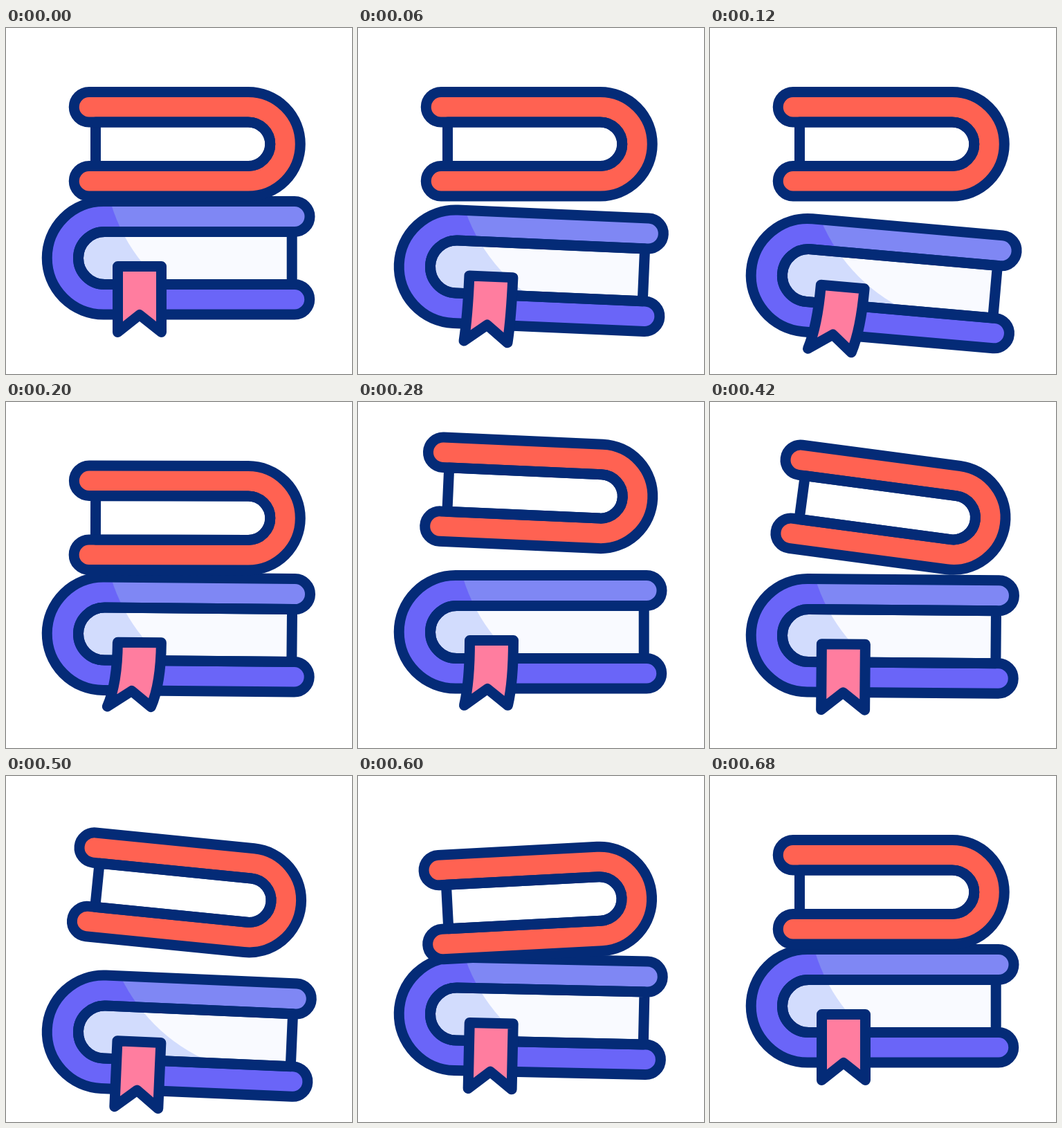
Animation, 500 px wide and 500 px high, one loop 1 s. Source, as an HTML page:

```html
<!DOCTYPE html>
<html lang="en">
<head>
<meta charset="utf-8">
<title>Bouncing books</title>
<style>
  html, body { margin: 0; width: 100%; height: 100%; overflow: hidden; background: #fff; }
  svg { display: block; width: 100%; height: 100%; }
  .line { fill: none; stroke: #042b77; stroke-width: 15; stroke-linejoin: round; }
</style>
</head>
<body>
<svg viewBox="0 0 500 500">
  <defs>
    <!-- The light stays put while the book moves through it -->
    <clipPath id="light"><circle cx="393" cy="181" r="252"/></clipPath>
    <path id="lowCover" d="M417 250.5H141A81.75 81.75 0 0 0 141 414H417A21.75 21.75 0 0 0 417 370.5H142.5A38 38 0 0 1 142.5 294.5H417A22 22 0 0 0 417 250.5Z"/>
    <path id="lowPages" d="M413.2 294.5H142.5A38 38 0 0 0 142.5 370.5H413.2Z"/>
    <path id="topCover" d="M120 92.5H350A75.25 75.25 0 0 1 350 243H120A21.75 21.75 0 0 1 120 199.5H350A31.75 31.75 0 0 0 350 136H120A21.75 21.75 0 0 1 120 92.5Z"/>
    <path id="topPages" d="M129.5 136H350A31.75 31.75 0 0 1 350 199.5H129.5Z"/>
  </defs>

  <g class="low">
    <use href="#lowPages" fill="#d2dcfd"/>
    <use href="#lowCover" fill="#6a65f8"/>
  </g>
  <g clip-path="url(#light)">
    <g class="low">
      <use href="#lowPages" fill="#f9faff"/>
      <path d="M141 250.5H417A22 22 0 0 1 417 294.5H141Z" fill="#7f87f4"/>
    </g>
  </g>
  <g class="low">
    <use href="#lowPages" class="line"/>
    <use href="#lowCover" class="line"/>
    <path id="ribbon" class="line" style="fill:#ff7d9f"/>
  </g>

  <g id="top">
    <use href="#topPages" fill="#fff"/>
    <use href="#topCover" fill="#ff6252"/>
    <use href="#topPages" class="line"/>
    <use href="#topCover" class="line"/>
  </g>
</svg>
<script>
const LOOP = 1000, STEP = 20;
const lowParts = document.querySelectorAll('.low');
const topBook = document.getElementById('top');
const ribbon = document.getElementById('ribbon');

const progress = (t, from, to) => Math.min(1, Math.max(0, (t - from) / (to - from)));
const ease = u => u * u * (3 - 2 * u);

// Eases from 0 up to 1 at the peak and back to 0
const swell = (t, start, peak, end) =>
  t < peak ? ease(progress(t, start, peak)) : ease(progress(t, end, peak));

// Free flight: a parabola with height 1
function hop(t, start, end) {
  const u = progress(t, start, end);
  return 4 * u * (1 - u);
}

const pose = (drop, tilt, x, y) => `translate(0 ${drop}) rotate(${tilt} ${x} ${y})`;

// The lower book dips to wind up, then again when the upper one lands
function lowPose(t) {
  const windUp = swell(t, 0, 120, 220);
  const drop = 25 * windUp + 41 * swell(t, 391, 524, 641);
  const tilt = 5 * windUp + 2.85 * swell(t, 380, 535, 655);
  return pose(drop, tilt, 141, 332);
}

// The upper book is thrown, sinks on landing and rocks back
function topPose(t) {
  const drop = 16 * swell(t, 420, 540, 680) - 38 * hop(t, 222, 421);
  const tilt = 7.7 * swell(t, 180, 440, 620) - 3.3 * swell(t, 500, 595, 680);
  return pose(drop, tilt, 350, 181);
}

function ribbonPath(t) {
  const sway = -14.5 * swell(t, 0, 180, 395);
  const tip = 439.5 + sway * 0.15;
  return `M161.5 344.5H224.5Q224.5 404 ${224.5 + sway} ${tip}`
    + `L${193 + sway * 0.75} 414.5L${161.5 + sway} ${tip}Q161.5 404 161.5 344.5Z`;
}

function draw(t) {
  const low = lowPose(t);
  lowParts.forEach(part => part.setAttribute('transform', low));
  topBook.setAttribute('transform', topPose(t));
  ribbon.setAttribute('d', ribbonPath(t));
}

let start;
function tick(now) {
  start ??= now;
  draw(Math.floor((now - start) % LOOP / STEP) * STEP);
  requestAnimationFrame(tick);
}
draw(0);
requestAnimationFrame(tick);
</script>
</body>
</html>
```
